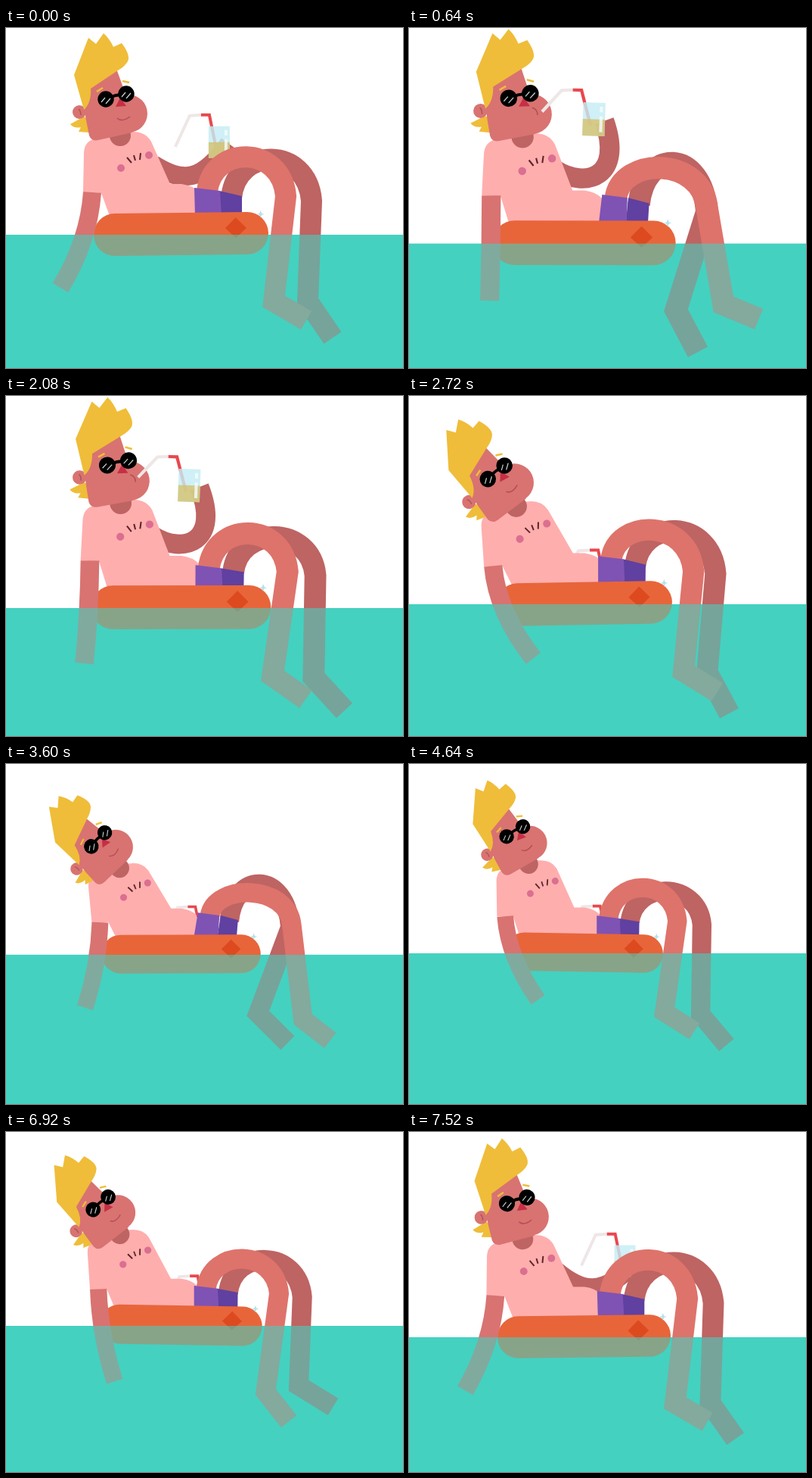
Recreate the animation shown at these times as an HTML page with a canvas. Size 525 px wide and 449 px high, loop 7.56 s.

```html
<!DOCTYPE html>
<html lang="en">
<head>
<meta charset="utf-8">
<title>Floating sunbather</title>
<style>
html, body { margin: 0; width: 100%; height: 100%; overflow: hidden; background: #fff; }
canvas { display: block; }
</style>
</head>
<body>
<canvas id="stage" width="525" height="449"></canvas>
<script>
const ctx = document.getElementById('stage').getContext('2d');
const LOOP = 7560, KICK = LOOP / 3;
const SKIN = '#d87371', SHADE = '#be6463', LEG = '#de736b', PINK = '#ffaeae',
      HAIR = '#efbd39', WATER = '#45d1c0';

// Periodic cubic through knots [time, ...values]; "loose" lets it swing past the knots.
function spline(period, knots, loose) {
  const n = knots.length;
  const gap = i => (knots[(i + 1) % n][0] - knots[i][0] + period) % period;
  const slope = (i, c) => (knots[(i + 1) % n][c] - knots[i][c]) / gap(i);
  const tangent = (i, c) => {
    const p = (i + n - 1) % n, a = slope(p, c), b = slope(i, c);
    if (loose) return (gap(i) * a + gap(p) * b) / (gap(i) + gap(p));
    return a * b <= 0 ? 0 : 2 * a * b / (a + b);
  };
  return time => {
    const t = time % period;
    let i = n - 1;
    while (knots[i][0] > t) i--;
    const j = (i + 1) % n, h = gap(i), u = (t - knots[i][0]) / h, v = 1 - u;
    return knots[i].slice(1).map((a, k) => {
      const c = k + 1;
      return a * v * v * (1 + 2 * u) + knots[j][c] * u * u * (3 - 2 * u)
        + h * u * v * (v * tangent(i, c) - u * tangent(j, c));
    });
  };
}

// water level
const waterAt = spline(LOOP, [
  [0, 273], [500, 286], [1000, 278], [1400, 275], [1900, 281], [2300, 278], [2720, 275],
  [3080, 263], [3840, 250], [4640, 250], [5520, 260], [6200, 260], [6920, 256], [7520, 271]]);

// float tilt in degrees
const tiltAt = spline(LOOP, [
  [0, -.7], [1400, 1], [2720, -1], [4640, 1], [5520, -.6], [6920, 1]]);

// chest x, chest y, chest turn, head turn
const bodyAt = spline(LOOP, [
  [0, 0, 0, 0, 0], [700, 2, -3, 2, 2], [1400, 3.5, -5.5, 4, 4.5], [2250, 1, -2, 1, 1],
  [2720, -5.5, 1, -5, -24.5], [3080, -5, 3, -6.5, -31], [3600, -5, 3, -6.5, -31],
  [4640, .5, 0, -2, -17], [5520, -5, 3.5, -6.5, -28.5], [6300, -2, 0, -3, -20],
  [6920, -4, -1, -5, -25.5], [7520, -1, 0, -.5, -2.5]]);

// trailing hand
const handAt = spline(LOOP, [
  [0, 72, 343], [750, 115, 345], [1400, 85, 342], [1900, 95, 344], [2720, 165, 344],
  [3700, 90, 350], [4640, 164, 341], [5520, 91, 355], [6400, 155, 345], [6920, 137, 352],
  [7520, 73, 344]]);

// centre of the glass
const glassAt = spline(LOOP, [
  [0, 282, 151], [300, 246, 118], [1400, 242, 115], [2250, 242, 116], [2450, 280, 155],
  [2650, 270, 225], [2720, 263, 238], [4640, 268, 240], [5520, 266, 239], [6920, 268, 238],
  [7350, 270, 235], [7520, 286, 172]]);

// hip x, y, front arch, back arch, then knee, ankle, toe of the front and the back leg
const legsAt = spline(KICK, [
  [0, 0, 0, 0, 0, 370, 222, 354, 361, 397, 386, 404, 228, 399, 361, 432, 409],
  [200, 1, -1, 5, 3, 375, 230, 362, 361, 406, 388, 404, 233, 393, 362, 422, 416],
  [480, 4, 0, 6, -1, 383, 229, 396, 350, 441, 369, 390, 233, 359, 358, 385, 412],
  [1400, 6, 2, 14, -2, 389, 230, 393, 375, 429, 414, 396, 233, 357, 359, 408, 395],
  [1880, 1, 5, 7, 5, 371, 227, 352, 367, 385, 409, 404, 232, 399, 358, 448, 388],
  [2120, 1, 7, 6, 8, 368, 226, 349, 359, 393, 387, 404, 231, 402, 362, 440, 407]], true);

const clamp = v => Math.max(0, Math.min(1, v));
const rad = deg => deg * Math.PI / 180;

function fill(color, d) {
  ctx.fillStyle = color;
  ctx.fill(new Path2D(d));
}
function line(color, width, d) {
  ctx.strokeStyle = color;
  ctx.lineWidth = width;
  ctx.stroke(new Path2D(d));
}
function dot(color, x, y, r) {
  ctx.fillStyle = color;
  ctx.beginPath();
  ctx.arc(x, y, r, 0, 2 * Math.PI);
  ctx.fill();
}
function within(draw, x, y, deg, px, py) {
  ctx.save();
  ctx.translate(x, y);
  ctx.rotate(rad(deg));
  ctx.translate(-px, -py);
  draw();
  ctx.restore();
}

function drawLeg(color, hipX, hipY, arch, [kx, ky, ax, ay, tx, ty]) {
  line(color, 28, `M${hipX},${hipY} C${hipX + 7},${arch} ${kx - 6},${arch} ${kx},${ky} L${ax},${ay} L${tx},${ty}`);
}

function drawShorts(x, y) {
  fill('#6040a0', `M${282 + x},${215 + y} L${312 + x * .3},${222 + y * .7} L312,248 L284,248 Z`);
  fill('#7f53b4', `M${249 + x},${211 + y} L${283 + x * .6},${215 + y} L285,248 L250,248 Z`);
}

function drawFloat() {
  ctx.fillStyle = '#e8653a';
  ctx.beginPath();
  ctx.roundRect(116, 244, 231, 56, 28);
  ctx.fill();
  fill('#dd4a20', 'M304,251 L318,265 L304,278 L290,265 Z');
  fill('#b5e2ea', 'M337,242 L338.5,246 L342,247 L338.5,248 L337,252 L335.5,248 L332,247 L335.5,246 Z');
}

function drawHead(sipping) {
  fill(HAIR, 'M85,127 L103,117 L111,121 L110,138 L96,137 L99,131 Q90,133 85,127 Z');
  dot(SKIN, 97, 111, 9);
  line('#ad5357', 1.5, 'M96,107 Q99,109 99,115');
  fill(SKIN, 'M102,98 L106,122 L110,142 Q113,150 122,148 L167,138 L157,84 L146,54 L108,72 Z');
  dot(SKIN, 162, 113, 25);
  fill(HAIR, 'M90,62 L109,13 Q114,17 119,21 L129,7 Q137,14 142,25 L153,20 Q165,36 161,44 Q157,51 148,56 L112,80 Q113,99 103,108 Z');
  line(HAIR, 2.5, 'M120,84 L128,79 M154,70 L163,72');
  fill('#c62f45', 'M151,92 L145,104 L159,103 Z');
  line('#000', 4, 'M138,92 Q146,87 154,89');
  dot('#000', 132, 94, 10.7);
  dot('#000', 159, 87, 10.7);
  line('#c9d3cf', 1.2, 'M126,98 L131,92 M132,100 L138,93 M153,91 L158,85 M159,93 L165,86');
  line('#b34d55', 1.5, sipping ? 'M162,105 Q169,107 169,114' : 'M147,119 Q153,125 164,117');
}

function drawArm(x, y, low) {
  const reach = 282 - x;
  line(SHADE, 25, `M195,${180 + 20 * low} C${235 - 35 * low},${205 + 25 * low}
    ${x - 24 + reach * 1.62},${y + 52 + reach * .52} ${x + 13},${y + 2}`);
}

function drawDrink(x, y, sip) {
  within(() => {
    line('#efe6e6', 4, `M${-58 - 8 * sip},${6 - 14 * sip} L${-39 - 3 * sip},-35 L${-24 - 4 * sip},-36`);
    line('#e8484e', 4, `M${-24 - 4 * sip},-36 L${-13 - 4 * sip},-36 L-4,8`);
    ctx.globalAlpha = .82;
    fill('#c5edf5', 'M-14,-21 H14 V21 H-14 Z');
    fill('#d5c26f', 'M-14,0 H14 V21 H-14 Z');
    fill('#f4fbfb', 'M7,-16 h4 v7 h-4 Z M7,-4 h4 v20 h-4 Z');
  }, x, y, 2 * sip, 0, 0);
}

function drawBody(t) {
  const [dx, dy, turn, nod] = bodyAt(t), [gx, gy] = glassAt(t), [hx, hy] = handAt(t);
  const leg = legsAt(t), [hipX, hipY, archF, archB] = leg;
  const low = clamp((gy - 150) / 88), sip = clamp((282 - gx) / 40) * clamp((150 - gy) / 30);
  const c = Math.cos(rad(turn)), s = Math.sin(rad(turn));
  const cx = 170.5 + dx, cy = 176.5 + dy;
  // a point that moves with the chest
  const chest = (x, y) => [cx + (x - 170.5) * c - (y - 176.5) * s, cy + (x - 170.5) * s + (y - 176.5) * c];
  const raised = gy < 190;

  drawArm(gx, gy, low);
  if (!raised) drawDrink(gx, gy, sip);

  fill(PINK, `M${chest(103, 166)} Q${chest(103, 148)} ${chest(122, 145)} L${chest(165, 137)}
    Q${chest(184, 136)} ${chest(192, 150)} L217,206 L232,206 Q247,208 254,216 L254,248 L137,248
    L${chest(126, 218)} L${chest(102, 217)} Z`);
  within(() => {
    dot('#db6f90', 152, 185, 5);
    dot('#db6f90', 189, 168, 5);
    line('#5b2528', 2, 'M160,171 L166,178 M169,168 L171,175 M178,165 L177,174');
    dot(SHADE, 151, 142, 14);
  }, cx, cy, turn, 170.5, 176.5);

  within(() => drawHead(sip > .5), ...chest(151, 142), nod, 151, 142);
  if (raised) drawDrink(gx, gy, sip);

  drawLeg(SHADE, 298 + hipX * .5, 224 + hipY * .5, 156 + archB * 1.3, leg.slice(10));
  drawLeg(LEG, 266 + hipX, 216 + hipY, 154 + archF * 1.2, leg.slice(4, 10));
  drawShorts(hipX, hipY);
  within(drawFloat, 231.5, 272, tiltAt(t)[0], 231.5, 272);

  const [ex, ey] = chest(114, 217);
  line(SKIN, 24, `M${ex},${ey} Q${ex + (hx - ex) * .1},${(ey + hy) / 2} ${hx},${hy}`);
}

function drawWater(level, alpha) {
  ctx.globalAlpha = alpha;
  ctx.fillStyle = WATER;
  ctx.fillRect(0, level, 525, 449 - level);
  ctx.globalAlpha = 1;
}

function frame(now) {
  const t = now % LOOP, [level] = waterAt(t), scale = 1 + (level - 273) * .0042;
  ctx.fillStyle = '#fff';
  ctx.fillRect(0, 0, 525, 449);
  drawWater(level, 1);
  ctx.save();
  ctx.translate(232, level);
  ctx.scale(scale, scale);
  ctx.translate(-232, -273);
  drawBody(t);
  ctx.restore();
  drawWater(level, .59);
  requestAnimationFrame(frame);
}
requestAnimationFrame(frame);
</script>
</body>
</html>
```
